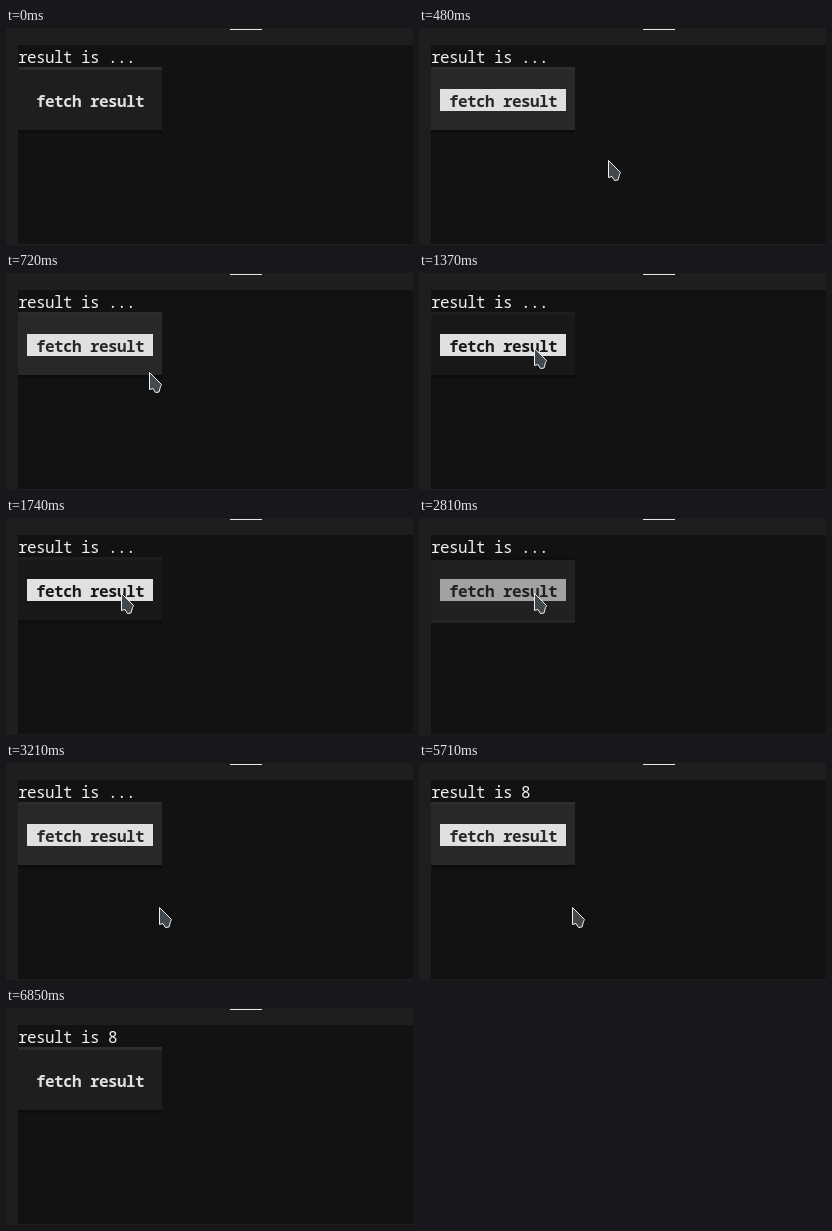
These frames come from a looping animation (407x217 px, 6930 ms). An HTML page:

```html
<!DOCTYPE html>
<html lang="en">
<head>
<meta charset="utf-8">
<title>Fetch result</title>
<style>
  html, body { margin: 0; width: 100%; height: 100%; overflow: hidden; background: #1e1e1e; }
  svg { display: block; }
  text {
    font: 500 16px "Noto Sans Mono", "DejaVu Sans Mono", monospace;
    letter-spacing: -.6px; fill: #f0f0f0; white-space: pre;
  }
  #label { font-weight: 700; }
</style>
</head>
<body>
<svg width="407" height="217" viewBox="0 0 407 217">
  <rect width="407" height="217" fill="#1e1e1e"/>
  <rect x="224" y="1" width="32" height="1" fill="#e7e7e7"/>
  <rect x="12" y="17" width="395" height="199" fill="#121212"/>
  <text id="result" x="12" y="35"></text>
  <rect id="face" x="12" y="39" width="144" height="66"/>
  <rect id="top" x="12" y="39" width="144" height="3"/>
  <rect id="bottom" x="12" y="102" width="144" height="3"/>
  <rect id="mark" x="21" y="61" width="126" height="22"/>
  <text id="label" x="30" y="79">fetch result</text>
  <path id="cursor" d="M.5 .5V17.5L4 16.5L6.5 20.5L10 20L11.5 14.5L12.5 12.5Z"
        fill="#43484c" stroke="#f2f2f2" stroke-linejoin="round"/>
  <circle id="press" cx="116" cy="77" r="15" fill="#ff0" fill-opacity=".47"/>
</svg>
<script>
const LOOP = 6930, TICK = 40, FLASH = 210;
const el = id => document.getElementById(id);
const within = (t, from, to) => t >= from && t < to;
const mix = (a, b, k) => a + (b - a) * k;

// Grey levels of the theme
const BACK = 0x12, DARK = 0x0d, SURFACE = 0x1e, LIGHT = 0x2d, TEXT = 0xe0;

const CLICKS = [
  { down: 1080, up: 1160 }, { down: 1450, up: 1530 },
  { down: 2070, up: 2190 }, { down: 2650, up: 2810 }
];

const STROKES = [
  { start: 160, end: 1000, from: [272, 187], to: [115, 75],
    ease: (k, axis) => 1 - (1 - k) ** (axis ? 1.4 : 1.57) },
  { start: 2810, end: 3210, from: [115, 75], to: [153, 144],
    ease: k => (1 - Math.cos(Math.PI * k)) / 2 },
  { start: 6120, end: 6280, from: [165, 150], to: [368, 220], ease: k => k }
];

function look(t) {
  const focus = within(t, 160, 6850);
  const active = CLICKS.some(c => within(t, c.up, c.up + FLASH));
  const hover = !active && within(t, 880, 3020);
  const face = mix(hover ? DARK : SURFACE, TEXT, focus ? .05 : 0);
  const top = active ? DARK : hover ? SURFACE : LIGHT;
  const bottom = active ? LIGHT : DARK;
  const grey = level => {
    const v = Math.round(active ? mix(level, BACK, .3) : level);
    return `rgb(${v},${v},${v})`;
  };
  return {
    face: grey(face), top: grey(top), bottom: grey(bottom),
    mark: focus ? grey(TEXT) : 'none',
    label: grey(focus ? face : TEXT)
  };
}

function pointer(t) {
  if (!within(t, 160, 6280)) return null;
  const s = STROKES.filter(s => s.start <= t).pop();
  const time = Math.floor((t - s.start) / TICK) * TICK;
  const k = Math.min(1, time / (s.end - s.start));
  return s.from.map((v, axis) => Math.round(mix(v, s.to[axis], s.ease(k, axis))));
}

function draw(t) {
  for (const [id, fill] of Object.entries(look(t))) el(id).style.fill = fill;
  el('result').textContent = 'result is ' + (t < 5710 ? '...' : '8');
  const held = CLICKS.some(c => within(t, c.down, c.up));
  el('press').style.display = held ? '' : 'none';
  const at = pointer(t);
  el('cursor').style.display = at ? '' : 'none';
  if (at) el('cursor').setAttribute('transform', `translate(${at})`);
}

const begin = performance.now();
function frame() {
  draw((performance.now() - begin) % LOOP);
  requestAnimationFrame(frame);
}
frame();
</script>
</body>
</html>
```
